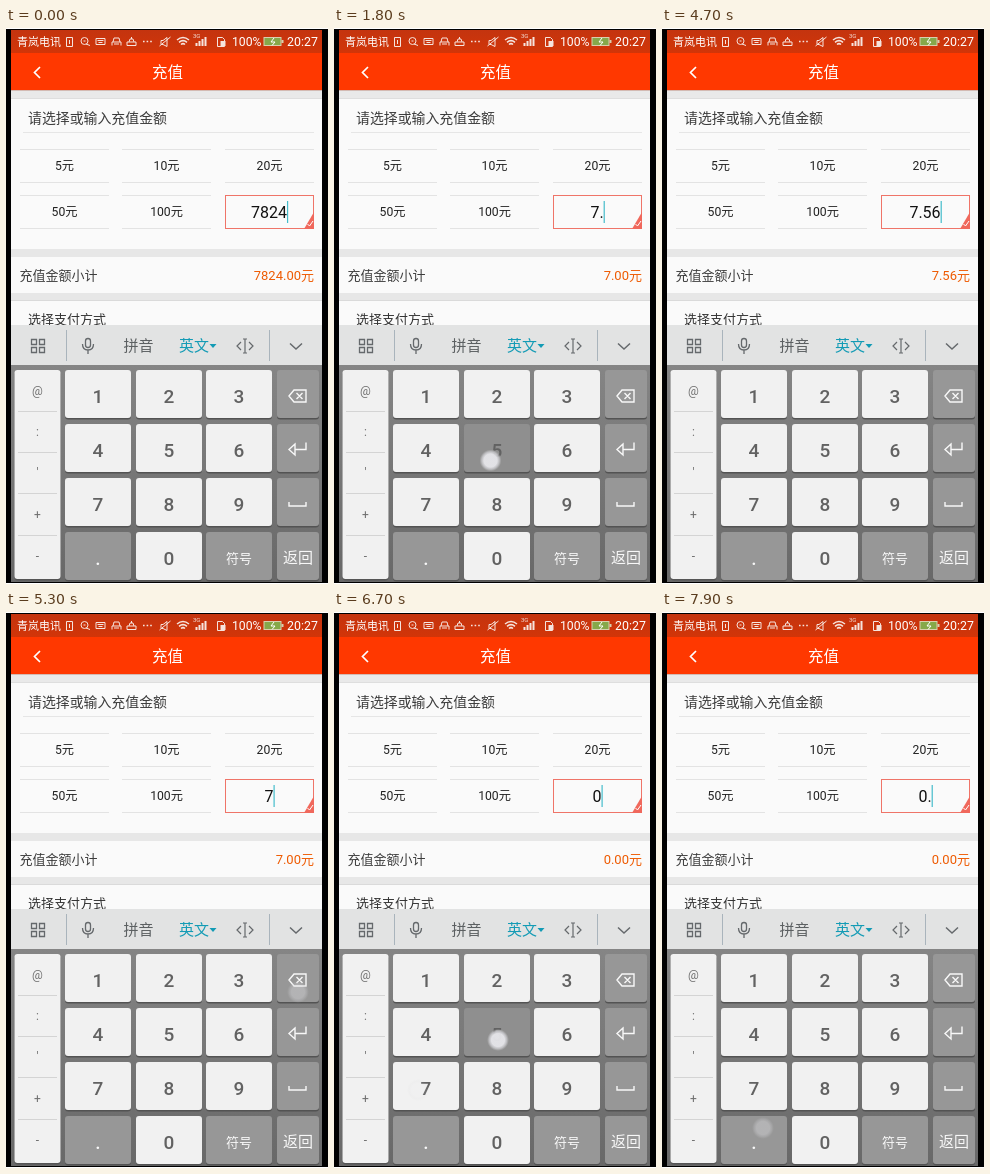
Write an HTML page that moves like this. It is 322x556 px and loops after 8 s.

```html
<!DOCTYPE html>
<html lang="zh-CN">
<head>
<meta charset="utf-8">
<title>充值</title>
<style>
html, body { margin: 0; width: 100%; height: 100%; overflow: hidden; background: #000; }
svg { display: block; width: 322px; height: 556px; }
text { font-family: Roboto, "Noto Sans CJK SC", "Noto Sans CJK", sans-serif; }
</style>
</head>
<body>
<svg id="stage" viewBox="0 0 322 556" xmlns="http://www.w3.org/2000/svg"></svg>
<script>
const stage = document.getElementById('stage');
const rect = (x, y, w, h, fill, more = '') =>
  `<rect x="${x}" y="${y}" width="${w}" height="${h}" fill="${fill}" ${more}/>`;
const text = (s, x, y, size, fill, more = '') =>
  `<text x="${x}" y="${y}" font-size="${size}" fill="${fill}" ${more}>${s}</text>`;
const mid = 'text-anchor="middle"', bold = 'font-weight="500"';
const line = (d, color, width = 1, more = '') =>
  `<path d="${d}" fill="none" stroke="${color}" stroke-width="${width}" ${more}/>`;

function statusBar() {
  const w = '#f6e4de';
  return rect(0, 0, 322, 1, '#fff') + rect(0, 555, 322, 1, '#fff') +
    rect(5, 2, 311, 23.5, 'url(#bar)') +
    text('青岚电讯', 11, 17.5, 11, '#fff', bold) +
    line('M60.5 9.5h6v9h-6zM63.5 12v4', w) +
    line('M75 13a3.5 3.5 0 1 1 7 0a3.5 3.5 0 1 1-7 0M77.5 13h2M80 16l4 1.500', w) +
    line('M90 10.500h9v6h-9zM91.500 12.500h6M92.500 14.500h4', w) +
    line('M106 17.500v-3.500h9v3.500M107 14l1-4h5l1 4M108 16h5', w) +
    line('M121 17.500v-3.500h9v3.500h-9M123 14l1-3h3l1 3M125.500 11v-2', w) +
    line('M137 13.500h9', w, 1.6, 'stroke-dasharray="1.600 2"') +
    line('M155 16.500h2l4 2v-9l-4 3h-2zM153.500 18l11-9', w) +
    line('M171 12q6-5 12 0M173 14.300q4-3.300 8 0M175 16.500q2-1.700 4 0', w, 1.5) +
    text('3G', 187, 10, 6, w) +
    line('M190.500 18v-3M193.500 18v-5M196.500 18v-7M199.500 18v-9', w, 2) +
    line('M211.500 9.500h5l2 2v7h-7z', w) + rect(214.5, 13, 5, 5, w) +
    text('100%', 226, 17.5, 12.2, '#fff') +
    rect(258, 9.5, 17, 8, '#86a84a', 'stroke="#d8cfae"') + rect(275.5, 12, 2, 3, '#d8cfae') +
    line('M268 10l-3 4h4l-3 3.500', '#fff') +
    text('20:27', 281, 17.5, 12.4, '#fff');
}

function page() {
  let s = rect(5, 25, 311, 37.5, '#ff3800') +
    line('M34 39l-5.500 5.500l5.500 5.500', '#fff', 1.7) +
    text('充值', 161.5, 50, 15.5, '#fff', mid + bold) +
    rect(5, 62.5, 311, 235.5, '#fafafa') + rect(5, 62.5, 311, 7.5, '#e9e9e9') +
    line('M5 70.500h311', '#dedede') +
    text('请选择或输入充值金额', 22, 95, 13.9, '#3c3c3c') +
    line('M17 104.500h291', '#e6e6e6');
  ['5元', '10元', '20元', '50元', '100元'].forEach((label, i) => {
    const x = [14, 116, 219][i % 3], y = i < 3 ? 121 : 167;
    s += line(`M${x} ${y + .5}h89m-89 33h89`, '#e3e3e3') +
      text(label, x + 44.5, y + 21, 12.2, '#222', mid);
  });
  return s + rect(219.5, 167.5, 88, 33, '#fafafa', 'stroke="#ef7468"') +
    '<path d="M308 184v17h-10z" fill="#f0685c"/>' + line('M301.500 196l2 2l3.500-5', '#fff') +
    rect(5, 221, 311, 8, '#e7e7e7') +
    text('充值金额小计', 13.5, 252, 13, '#3c3c3c') +
    rect(5, 265, 311, 7, '#e7e7e7') + line('M5 272.500h311', '#dadada') +
    text('选择支付方式', 22, 295.5, 13, '#333');
}

function toolbar() {
  const g = '#65696c';
  return rect(5, 297, 311, 41, '#e2e3e3') +
    line('M25.500 311.500h5v5h-5zm8 0h5v5h-5zm0 8h5v5h-5zm-8 0h5v5h-5z', g, 1.3) +
    line('M60.500 302v31M263.500 302v31', '#a9b4bc') +
    rect(79.5, 310.5, 5, 9, 'none', `rx="2.5" stroke="${g}" stroke-width="1.3"`) +
    line('M76.500 316q0 6 5.500 6t5.500-6M82 322v4', g, 1.3) +
    text('拼音', 132.5, 323, 15, '#5c6062', mid) +
    text('英文', 173, 323, 15, '#139bb5', bold) +
    '<path d="M203.500 316h7l-3.500 4z" fill="#139bb5"/>' +
    line('M235 314l-4 4l4 4M243 314l4 4l-4 4M239 311v14M237 311h4M237 325h4', g, 1.2) +
    line('M284 315.500l6 5.500l6-5.500', g, 1.5);
}

const cols = [59, 130, 200, 271], rows = [342, 396, 450, 504];
const keys = ['1', '2', '3', 'del', '4', '5', '6', 'enter', '7', '8', '9', 'space', '.', '0', '符号', '返回'];
const isDark = i => i % 4 === 3 || i === 12 || i === 14;
const icons = {
  del: 'M283 368l5-6h12v12h-12zM290.500 365l6 6m0-6l-6 6',
  enter: 'M289 416l-6 5.500l6 5.500zM289 421.500h11v-7',
  space: 'M283 474v4h17v-4'
};

function keyboard() {
  let s = rect(5, 337, 311, 217, 'url(#board)') +
    rect(8.500, 343.500, 46, 209, '#555', 'rx="3"') + rect(8.500, 342, 46, 209, '#f1f1f1', 'rx="3"') +
    line('M12 383.500h39m-39 41h39m-39 41h39m-39 42h39', '#d4d4d4');
  ['@', ':', "'", '+', '-'].forEach((c, i) =>
    s += text(c, 31.5, [367, 408, 449, 491, 532][i], 12, '#707070', mid));
  keys.forEach((k, i) => {
    const x = cols[i % 4], y = rows[i >> 2], w = i % 4 === 3 ? 42 : 66, dark = isDark(i);
    const size = k === '符号' ? 13 : k === '返回' ? 15 : 19;
    s += rect(x, y + 1.5, w, 48, '#535353', 'rx="3"') +
      rect(x, y, w, 48, '', `rx="3" id="key${i}"`) +
      (icons[k] ? line(icons[k], '#f8f8f8', 1.4) :
        text(k, x + w / 2, y + (size < 19 ? 31 : 33), size, dark ? '#f8f8f8' : '#626262', mid + bold));
  });
  return s;
}

stage.innerHTML = `<defs>
  <linearGradient id="bar" x2="0" y2="1"><stop stop-color="#c4340f"/><stop offset="1" stop-color="#d23508"/></linearGradient>
  <linearGradient id="board" x2="0" y2="1"><stop stop-color="#858585"/><stop offset="1" stop-color="#686868"/></linearGradient>
  <radialGradient id="glow"><stop offset=".6" stop-color="#e6e6ea"/><stop offset=".8" stop-color="#c8c8cc" stop-opacity=".85"/><stop offset="1" stop-color="#bbb" stop-opacity="0"/></radialGradient>
  </defs>` + statusBar() + page() + toolbar() + keyboard() +
  text('', 263, 190, 16, '#111', mid + ' id="amount"') +
  rect(0, 173, 1.2, 22, '#45bccb', 'id="caret"') +
  text('', 308, 252, 13, '#ee5a00', 'text-anchor="end" id="total"') +
  '<g id="dots"></g>';

// time, value of the field; each edit restarts the caret blink
const edits = [[-300, '7824'], [400, '782'], [600, '78'], [800, '7'], [1600, '7.'], [1900, '7.5'],
  [2000, '7.56'], [2700, '7.5'], [3700, '7.56'], [4800, '7.5'], [5000, '7.'], [5200, '7'], [5400, ''],
  [5800, '0'], [6700, '0'], [7200, '0'], [7800, '0.']];

// press, release, key, x, y
const taps = [[400, 400, 'del', 292, 380], [600, 600, 'del', 291, 382], [700, 800, 'del', 291, 381],
  [1500, 1500, '.', 96, 522], [1700, 1800, '5', 156.5, 432.5], [1900, 1900, '6', 226, 426],
  [2700, 2700, 'del', 291, 382], [3700, 3700, '6', 228, 430],
  [4800, 4800, 'del', 292, 381], [5000, 5000, 'del', 291, 382], [5200, 5200, 'del', 292, 380],
  [5400, 5400, 'del', 291, 382], [5600, 5700, '0', 157, 538],
  [6400, 6500, '7', 84, 478], [6700, 6700, '5', 164, 428], [6900, 6900, '4', 88, 430],
  [7100, 7100, '9', 199, 461], [7200, 7200, '8', 181, 475], [7700, 7800, '.', 101, 516]];

const el = id => document.getElementById(id);
const FADE = 300;
const dotOpacity = age => age <= 0 ? .95 : .8 * (1 - age / FADE) ** 2;

function draw(now) {
  const t = Math.floor(now % 8000 / 100) * 100;
  const [since, value] = edits.filter(e => e[0] <= t).pop();
  const amount = el('amount');
  amount.textContent = value;
  el('total').textContent = Number(value || 0).toFixed(2) + '元';
  const width = value ? amount.getComputedTextLength() : 0;
  el('caret').setAttribute('x', 263 + width / 2);
  el('caret').setAttribute('opacity', (t - since) % 1000 < 500 ? 1 : 0);

  const live = taps.filter(p => t >= p[0] && t < p[1] + FADE);
  keys.forEach((k, i) => {
    const down = live.some(p => p[2] === k && t <= p[1]);
    const fill = isDark(i) ? (down ? '#777' : '#979797') : (down ? '#8f8f8f' : '#f1f1f1');
    el('key' + i).setAttribute('fill', fill);
  });
  el('dots').innerHTML = live.map(([, end, , x, y]) =>
    `<circle cx="${x}" cy="${y}" r="11" fill="url(#glow)" opacity="${dotOpacity(t - end)}"/>`).join('');
}

const start = performance.now();
function tick() {
  draw(performance.now() - start);
  requestAnimationFrame(tick);
}
tick();
</script>
</body>
</html>
```
